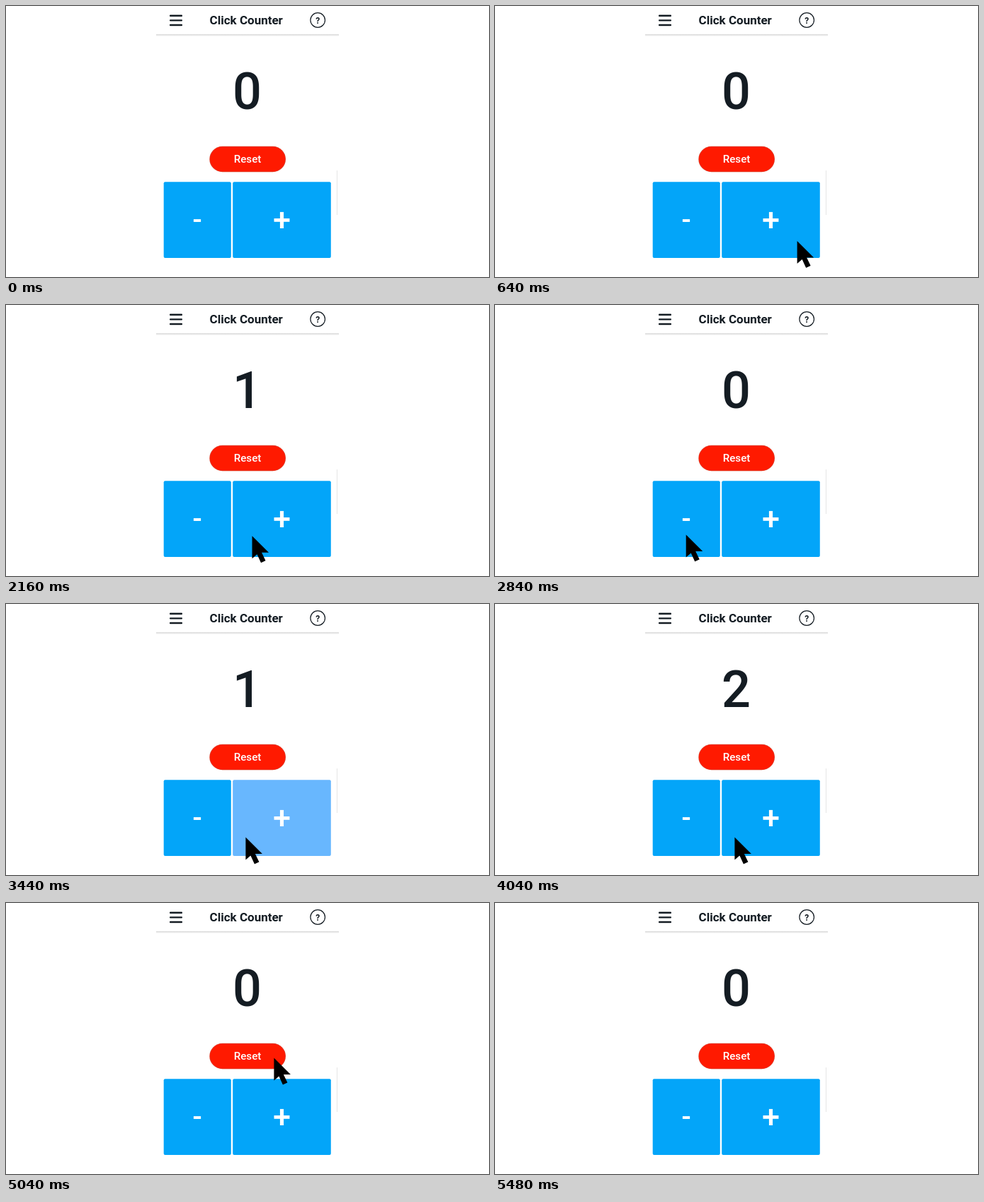
An HTML page with a canvas that plays this animation: 682 by 384 pixels, repeating every 5520 ms.

```html
<!DOCTYPE html>
<html lang="en">
<head>
<meta charset="utf-8">
<title>Click Counter</title>
<style>
html, body { margin: 0; width: 682px; height: 384px; overflow: hidden; background: #fff; }
canvas { display: block; }
</style>
</head>
<body>
<canvas id="stage" width="682" height="384"></canvas>
<script>
const ctx = document.getElementById('stage').getContext('2d');
const LOOP = 5520, PRESS = 190, COUNT_DELAY = 40;
const INK = '#141c23', BLUE = '#03a5f9', BLUE_LIT = '#68b7fe', RED = '#ff1a00';

const spot = (x, y) => ({ x, y });
const below = spot(446, 388);
const plusRight = spot(425.4, 329.5);
const minus = spot(263, 325);
const plusLeft = spot(338.4, 330.5);
const reset = spot(378.4, 219.5);
const exit = spot(412, 388);

const moves = [
  { at: 80, time: 660, to: plusRight },
  { at: 1840, time: 660, to: minus },
  { at: 2760, time: 440, to: plusLeft },
  { at: 4080, time: 440, to: reset },
  { at: 5080, time: 360, to: exit }
];

const add = n => n + 1, subtract = n => n - 1, clear = () => 0;
const clicks = [
  { at: 920, op: add },
  { at: 2560, op: subtract },
  { at: 3320, op: add },
  { at: 3680, op: add },
  { at: 4720, op: clear }
];

const ease = u => u * u * (3 - 2 * u);
const progress = (t, m) => ease(Math.min(1, Math.max(0, (t - m.at) / m.time)));

function pointerAt(t) {
  return moves.reduce((p, m) => {
    const k = progress(t, m);
    return spot(p.x + (m.to.x - p.x) * k, p.y + (m.to.y - p.y) * k);
  }, below);
}

function countAt(t) {
  return clicks.reduce((n, c) => t >= c.at + COUNT_DELAY ? c.op(n) : n, 0);
}

function keyColor(t, op) {
  const held = clicks.some(c => c.op === op && t >= c.at && t < c.at + PRESS);
  return held ? BLUE_LIT : BLUE;
}

function box(x, y, w, h, r, fill) {
  ctx.fillStyle = fill;
  ctx.beginPath();
  ctx.roundRect(x, y, w, h, r);
  ctx.fill();
}

function text(str, x, y, size, weight, fill) {
  ctx.font = `${weight} ${size}px Roboto, sans-serif`;
  ctx.textAlign = 'center';
  ctx.fillStyle = fill;
  ctx.fillText(str, x, y);
}

// Centres the visible glyph on a point
function glyph(str, x, y, size, weight, fill) {
  ctx.font = `${weight} ${size}px Roboto, sans-serif`;
  ctx.textAlign = 'center';
  const m = ctx.measureText(str);
  const dx = (m.actualBoundingBoxLeft - m.actualBoundingBoxRight) / 2;
  const dy = (m.actualBoundingBoxAscent - m.actualBoundingBoxDescent) / 2;
  text(str, x + dx, y + dy, size, weight, fill);
}

function header() {
  const shade = ctx.createLinearGradient(0, 40, 0, 43);
  shade.addColorStop(0, '#d4d4d4');
  shade.addColorStop(1, '#ffffff');
  ctx.fillStyle = shade;
  ctx.fillRect(212, 40, 258, 3);
  for (let i = 0; i < 3; i++) box(231, 12.6 + i * 6.6, 18, 2.4, 1, INK);
  text('Click Counter', 339.2, 25.6, 17, 700, INK);
  ctx.strokeStyle = INK;
  ctx.lineWidth = 1.2;
  ctx.beginPath();
  ctx.arc(440.2, 20, 10.3, 0, Math.PI * 2);
  ctx.stroke();
  glyph('?', 440.2, 20, 12, 700, INK);
}

function pointer({ x, y }) {
  ctx.fillStyle = '#000';
  ctx.fill(new Path2D(`M${x} ${y}v32l7 -6 5.5 12 6.5 -3 -5.5 -11.5h10z`));
}

function draw(t) {
  ctx.fillStyle = '#fff';
  ctx.fillRect(0, 0, 682, 384);
  header();
  ctx.fillStyle = '#e6e6e6';
  ctx.fillRect(467, 233, 1, 63);

  text(countAt(t), 340.5, 145.8, 72, 500, INK);

  box(287.3, 198.8, 107.7, 36.4, 18.2, '#d8412c');
  box(288, 199.5, 106.3, 35, 17.5, RED);
  text('Reset', 341, 222.3, 15.2, 500, '#fff');

  box(222.7, 249.3, 95.1, 107.7, 2, keyColor(t, subtract));
  box(320.2, 249.3, 138.6, 107.7, 2, keyColor(t, add));
  glyph('-', 270, 304.2, 40, 500, '#fff');
  glyph('+', 389.5, 303.3, 45, 500, '#fff');

  pointer(pointerAt(t));
}

const start = performance.now();
function tick() {
  draw((performance.now() - start) % LOOP);
  requestAnimationFrame(tick);
}
tick();
</script>
</body>
</html>
```
